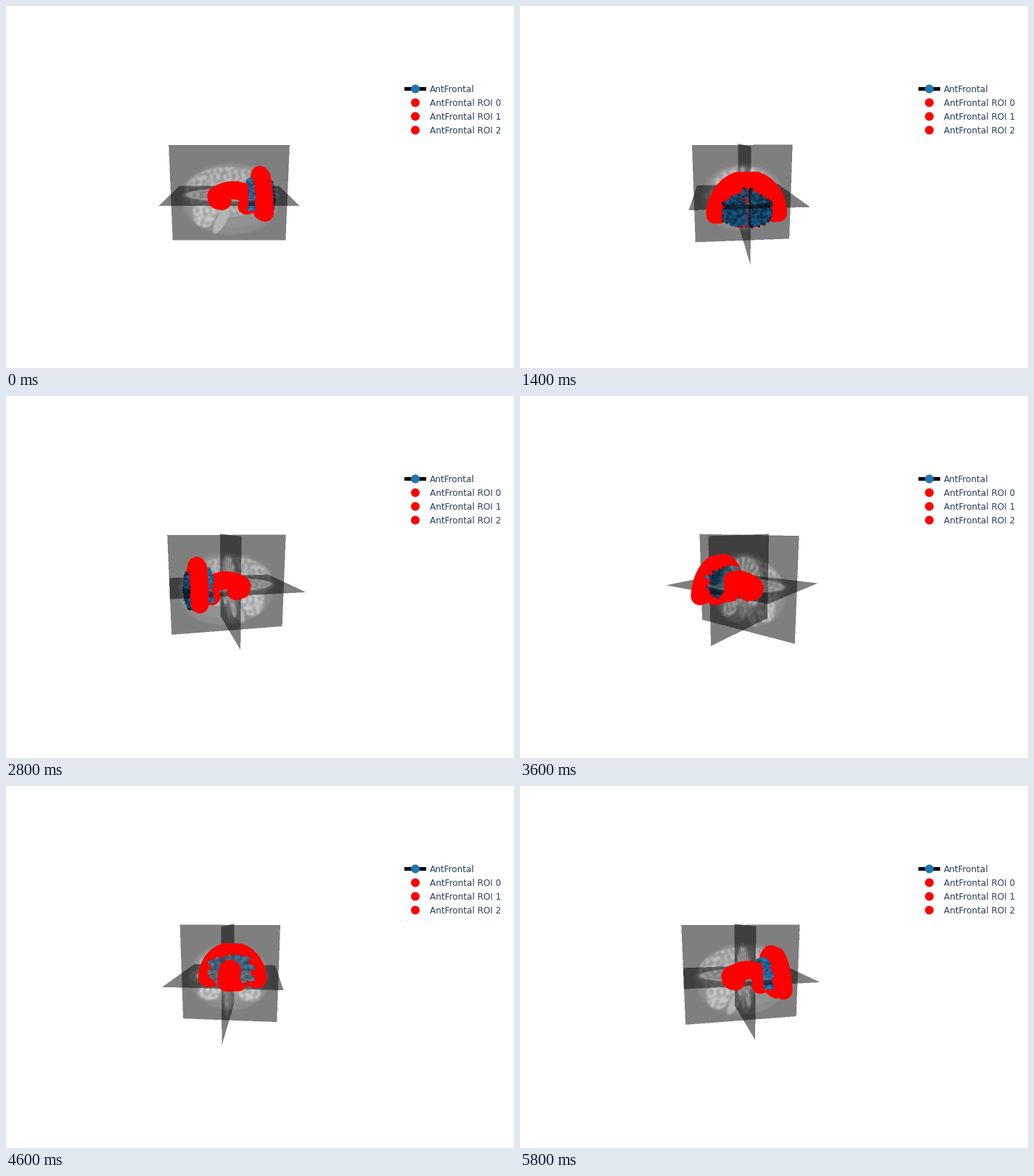
Recreate the animation shown at these times as a matplotlib script. Size 700 by 500 pixels, loop 6000 ms.

```python
import numpy as np
import matplotlib.pyplot as plt
from matplotlib.animation import FuncAnimation
from matplotlib.patches import Circle, Rectangle

W, H, DPI = 700, 500, 100
FRAMES, INTERVAL = 30, 200
X0, X1, Y0, Y1 = 190, 420, 180, 370      # window holding the 3D scene
SS = 2                                   # supersampling
CX, CY, DIST = 307.5, 260.0, 386.3       # scene centre, camera distance = focal length
ELEV = np.radians(11.4)
HALF = 80.5 * np.array([182, 218, 182]) / 218   # half size of the volume: x, y, z
OFFSET = (0.0, 0.4, 0.0)                 # where each slice cuts its axis
RED = np.array([1.0, 0.0, 0.0])
BLUE = np.array([31, 119, 180]) / 255
ROI_RADIUS, FIBER_RADIUS = 12.2, 1.6

rng = np.random.default_rng(4)
NX, NY = (X1 - X0) * SS, (Y1 - Y0) * SS
DX, DY = np.meshgrid(X0 + (np.arange(NX) + 0.5) / SS - CX,
                     CY - Y0 - (np.arange(NY) + 0.5) / SS)


# ---- slice textures -------------------------------------------------------

WAVE_ANGLE = rng.uniform(0, np.pi, 10)
WAVE_FREQ = rng.uniform(0.3, 0.85, 10)
WAVE_PHASE = rng.uniform(0, 2 * np.pi, 10)


def blob(u, v, cu, cv, ru, rv, tilt=0.0, soft=0.08):
    c, s = np.cos(tilt), np.sin(tilt)
    p, q = u - cu, v - cv
    r = np.hypot((c * p + s * q) / ru, (c * q - s * p) / rv)
    return np.clip((1 - r) / soft, 0, 1)


def folds(u, v):
    waves = sum(np.cos(k * (u * np.cos(a) + v * np.sin(a)) + p)
                for a, k, p in zip(WAVE_ANGLE, WAVE_FREQ, WAVE_PHASE))
    return np.tanh(waves / 2)


def gyri(u, v, n):
    ang = np.arctan2(v, u)
    r = np.hypot(u, v)
    return np.sin(n * ang + 0.9 * np.sin(0.25 * r)) * np.clip((r - 18) / 15, 0, 1)


def paint(base, mask, value):
    return base + mask * (value - base)


def sagittal(y, z):
    f = folds(y, z)
    g = 26 * blob(y, z, 2, -8, 70, 53)
    g = paint(g, blob(y, z, 2, -4, 66, 46), 38)
    g = paint(g, blob(y, z, -1, 3, 62, 36), 84 + 32 * f)
    g = paint(g, blob(y, z, 2, -7, 20, 10, soft=0.3), 105)
    g = paint(g, blob(y, z, -35, -27, 18, 23, soft=0.2), 112 + 32 * f)
    return paint(g, blob(y, z, -11, -38, 8, 24, -0.5, 0.25), 108)


def coronal(x, z):
    f = folds(x, z)
    g = 24 * blob(x, z, 0, -5, 59, 49)
    g = paint(g, blob(x, z, 0, -2, 53, 43), 40)
    g = paint(g, blob(x, z, 0, 4, 47, 36, soft=0.15), 98 + 34 * gyri(x, z, 17) + 18 * f)
    a = np.abs(x)
    g = paint(g, blob(a, z, 28, -27, 19, 13, soft=0.35), 120 + 36 * f)
    return paint(g, blob(x, z, 0, -36, 10, 17, soft=0.4), 72)


def axial(x, y):
    g = 22 * blob(x, y, 0, 2, 56, 70)
    g = paint(g, blob(x, y, 0, 0, 46, 62), 140)
    g = paint(g, blob(x, y, 0, 0, 41, 57), 108 + 30 * folds(x, y))
    return paint(g, blob(np.abs(x), y, 8, 0, 5, 18, 0.2, 0.4), 45)


SLICES = ((0, sagittal), (1, coronal), (2, axial))


# ---- point clouds ---------------------------------------------------------

def frontal_roi():
    z, k = np.meshgrid(np.linspace(-22, 25.5, 24), np.linspace(-1, 1, 30))
    arch = 39.3 * np.sqrt(1 - (np.maximum(z + 17, 0) / 44.5) ** 2)
    x = k * np.where(z < -17.5, 9, arch)
    notch = (z < -10) & (np.abs(x) > 9) & (np.abs(x) < 33)
    return np.stack([x, 44.2 - 0.045 * z, z], axis=-1)[~notch]


def callosum_roi():
    y = np.array([-9, -17, -18, -11, -2, 8, 20, 28, 32, 30, 24])
    z = np.array([-10, -8, -2, 2, 5, 6, 3, -2, -8, -14, -16])
    t = np.linspace(0, len(y) - 1, 60)
    k = np.arange(len(y))
    x = np.where(np.arange(60) % 2, 2.0, -2.0)
    return np.c_[x, np.interp(t, k, y), np.interp(t, k, z)]


def fibers(front=430, back=260, steps=34, bundles=16):
    n = front + back
    rear = np.arange(n) >= front
    side = rng.choice([-1.0, 1.0], n)

    # frontal ends fill a dome, narrower at the top
    x = rng.uniform(2, 30, n)
    low, top = -30 + 0.008 * x ** 2, 21 - 0.7 * x
    z = low + rng.random(n) * (top - low)
    y = 63 - 0.010 * x ** 2 - 0.008 * (z + 5) ** 2 - rng.uniform(0, 6, n)

    # rear ends gather into a spiky fan
    b = rng.integers(0, bundles, n)
    ang = np.radians(np.linspace(-40, 220, bundles)[b] + rng.normal(0, 3, n))
    r = rng.uniform(0.72, 1, bundles)[b] * rng.uniform(0.9, 1.03, n)
    x = np.where(rear, 37 * r * np.cos(ang), x * side)
    z = np.where(rear, -2 + 29 * r * np.sin(ang), z)
    y = np.where(rear, rng.uniform(26, 38, n), y)

    end = np.c_[x, y, z]
    start = np.c_[np.zeros(n), rng.uniform(28, 35, n), rng.uniform(-13, 2, n)]
    mid = np.c_[0.45 * x, np.where(rear, 29, 38), 0.5 * z]
    t = np.linspace(0, 1, steps)[:, None, None]
    pts = (1 - t) ** 2 * start + 2 * t * (1 - t) * mid + t ** 2 * end
    shade = np.where(rear, 0.85, 0.55) + rng.uniform(-0.28, 0.28, (steps, n))
    return pts.reshape(-1, 3), shade.reshape(-1, 1) * BLUE


ROIS = np.vstack([frontal_roi(), callosum_roi()])
FIBERS, FIBER_RGB = fibers()


# ---- rendering ------------------------------------------------------------

def camera(angle):
    c, s = np.cos(angle), np.sin(angle)
    ce, se = np.cos(ELEV), np.sin(ELEV)
    eye = np.array([ce * c, ce * s, se])
    right = np.array([-s, c, 0.0])
    up = np.array([-se * c, -se * s, ce])
    return eye, right, up


def project(pts, cam):
    eye, right, up = cam
    depth = DIST - pts @ eye
    px = (CX + pts @ right * DIST / depth - X0) * SS
    py = (CY - pts @ up * DIST / depth - Y0) * SS
    return px, py, depth


def disc_offsets(radius):
    k = int(np.ceil(radius))
    oy, ox = np.mgrid[-k:k + 1, -k:k + 1]
    keep = ox ** 2 + oy ** 2 <= radius ** 2
    return ox[keep], oy[keep]


def draw_fibers(img, zbuf, cam):
    px, py, depth = project(FIBERS, cam)
    order = np.argsort(-depth)
    ox, oy = disc_offsets(FIBER_RADIUS * SS)
    ix = (px[order].astype(int)[:, None] + ox).ravel()
    iy = (py[order].astype(int)[:, None] + oy).ravel()
    img[iy, ix] = np.repeat(FIBER_RGB[order], len(ox), axis=0)
    zbuf[iy, ix] = np.repeat(depth[order], len(ox))


def draw_slice(img, zbuf, cam, axis, texture):
    eye, right, up = cam
    ray = [-DIST * eye[k] + DX * right[k] + DY * up[k] for k in range(3)]
    den = np.where(np.abs(ray[axis]) < 1e-9, 1e-9, ray[axis])
    t = (OFFSET[axis] - DIST * eye[axis]) / den
    a, b = [k for k in range(3) if k != axis]
    u = DIST * eye[a] + t * ray[a]
    v = DIST * eye[b] + t * ray[b]
    hit = ((t > 0) & (np.abs(u) <= HALF[a]) & (np.abs(v) <= HALF[b])
           & (t * DIST < zbuf))
    gray = np.clip(texture(u[hit], v[hit]) / 255, 0, 1)
    img[hit] = 0.5 * img[hit] + 0.5 * gray[:, None]


def draw_rois(img, zbuf, cam):
    r = ROI_RADIUS * SS
    k = int(r) + 1
    near = np.full(zbuf.shape, np.inf)
    for px, py, depth in zip(*project(ROIS, cam)):
        ix, iy = int(px), int(py)
        ys, xs = np.ogrid[iy - k:iy + k + 1, ix - k:ix + k + 1]
        inside = (xs + 0.5 - px) ** 2 + (ys + 0.5 - py) ** 2 <= r * r
        part = near[iy - k:iy + k + 1, ix - k:ix + k + 1]
        np.minimum(part, depth, out=part, where=inside)
    img[near < zbuf] = RED


def render(i):
    cam = camera(2 * np.pi * i / FRAMES)
    img = np.ones((NY, NX, 3))
    zbuf = np.full((NY, NX), np.inf)
    draw_fibers(img, zbuf, cam)
    for axis, texture in SLICES:
        draw_slice(img, zbuf, cam, axis, texture)
    draw_rois(img, zbuf, cam)
    return img.reshape(NY // SS, SS, NX // SS, SS, 3).mean(axis=(1, 3))


# ---- figure ---------------------------------------------------------------

fig = plt.figure(figsize=(W / DPI, H / DPI), dpi=DPI, facecolor="white")
ax = fig.add_axes([0, 0, 1, 1])
ax.axis("off")
scene = ax.imshow(np.ones((Y1 - Y0, X1 - X0, 3)), extent=(X0, X1, Y1, Y0),
                  interpolation="nearest", aspect="auto", vmin=0, vmax=1)
ax.set_xlim(0, W)
ax.set_ylim(H, 0)

ax.add_patch(Rectangle((549, 112), 30, 5, fc="black", lw=0, snap=False))
labels = ["AntFrontal"] + [f"AntFrontal ROI {k}" for k in range(3)]
for row, label in enumerate(labels):
    y = 114.5 + 19 * row
    ax.add_patch(Circle((564, y), 6, fc=RED if row else BLUE, lw=0, zorder=3))
    ax.text(584, y + 4.2, label, family="DejaVu Sans", size=12 * 72 / DPI,
            color="#2a3f5f", va="baseline")

views = [render(i) for i in range(FRAMES)]


def update(i):
    scene.set_data(views[i])
    return (scene,)


anim = FuncAnimation(fig, update, frames=FRAMES, interval=INTERVAL,
                     repeat=True, repeat_delay=0)
plt.show()
```
